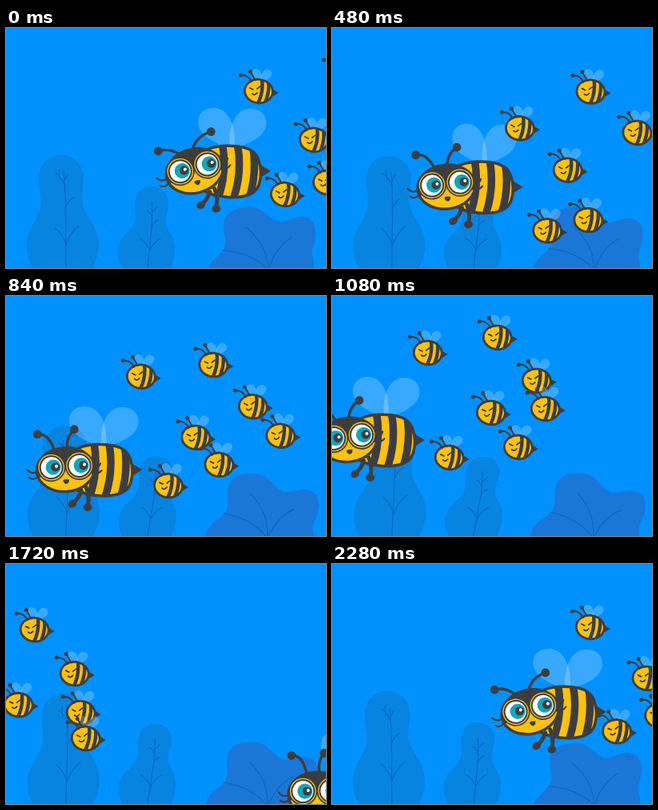
Animation, 400 px wide and 300 px high, one loop 2320 ms. Source, as an HTML page:

```html
<!DOCTYPE html>
<html lang="en">
<head>
<meta charset="utf-8">
<title>Bee swarm</title>
<style>
  html, body { margin: 0; width: 100%; height: 100%; overflow: hidden; background: #0091ff; }
  svg { display: block; width: 100vw; height: 100vh; }
  .dark { fill: #3d3d3f; }
  .gold { fill: #ffc20e; }
  .line { fill: none; stroke: #3d3d3f; stroke-linecap: round; stroke-linejoin: round; }
  .edge { stroke: #3d3d3f; }
  .wing { fill: #fff; fill-opacity: .22; }
  .bush { fill: #0783e0; }
  .leaf { fill: #1a77d8; }
  .vein { fill: none; stroke: #0a68bd; stroke-width: 1.1; stroke-linecap: round; }
</style>
</head>
<body>
<svg viewBox="0 0 400 300">
  <defs>
    <path id="trunk" d="M-40-20C-30-34 10-36 24-27C38-18 40 15 28 24C14 35-20 34-36 24Z"/>
    <clipPath id="trunkClip"><use href="#trunk"/></clipPath>
    <ellipse id="skull" cy="4" rx="36" ry="27.5"/>
    <clipPath id="skullClip"><use href="#skull"/></clipPath>
    <ellipse id="belly" rx="17.5" ry="14.8"/>
    <clipPath id="bellyClip"><use href="#belly"/></clipPath>

    <g id="eye">
      <circle class="dark" r="18"/>
      <circle class="gold" r="16.3"/>
      <circle class="dark" r="15"/>
      <circle r="13" fill="#fff"/>
      <circle cx="2.5" r="9.5" fill="#12a5bd"/>
      <circle class="dark" cx="5" r="5.6"/>
      <circle cx="6.5" cy="-1" r="2" fill="#fff"/>
    </g>

    <g id="small">
      <path class="wing" d="M4-12C-4-14-11-19-8-25C-5-31 6-29 4-12Z"/>
      <path class="wing" d="M3-12C2-22 7-29 13-27C20-24 17-14 3-12Z"/>
      <path class="dark" d="M15-4L25 2L15 8Z"/>
      <g transform="rotate(6)">
        <use href="#belly" class="gold"/>
        <g class="line" stroke-width="4.4" clip-path="url(#bellyClip)">
          <path d="M2-17Q7 0 0 17M10-17Q15 0 8 17"/>
        </g>
        <use href="#belly" class="line" stroke-width="2.8"/>
      </g>
      <g class="line">
        <path stroke-width="2" d="M-9-12Q-13-21-22-20M-4-14Q-8-20-10-24"/>
        <path stroke-width="1.8" d="M-11-4L-7-2M-2-3L2-6M-8 3Q-5 6-2 2"/>
      </g>
      <g class="dark">
        <circle cx="-22.5" cy="-20" r="2.5"/><circle cx="-10.5" cy="-24.5" r="2.5"/>
      </g>
    </g>
  </defs>

  <rect width="400" height="300" fill="#0091ff"/>

  <g id="bush1">
    <path class="bush" d="M69 159C87 159 98 174 97 190C96 205 93 214 97 225C102 239 116 249 116 272C116 286 111 295 106 304H36C30 295 26 284 26 270C26 252 38 243 42 228C46 213 41 203 41 188C41 172 51 159 69 159Z"/>
    <path class="vein" d="M75 302C74 265 76 215 72 180M75 271Q71 258 61 250M75 272Q79 257 91 247M75 224Q77 216 84 212M73 196Q70 187 62 181M73 191Q75 185 77 183M67 190L66 177"/>
  </g>
  <g id="bush2">
    <path class="bush" d="M181 198C196 198 204 209 203 221C202 234 198 238 200 246C203 256 211 261 211 276C211 288 208 296 204 304H147C142 295 139 286 140 276C141 261 155 256 160 244C165 232 159 227 162 214C164 204 171 198 181 198Z"/>
    <path class="vein" d="M177 302C178 275 185 250 182 217M179 277Q175 268 167 263M179 280Q182 270 193 263M182 248Q184 242 190 240M183 238Q181 231 176 228M183 230L189 224"/>
  </g>
  <g id="leaf">
    <path class="leaf" d="M250 312C250 292 268 286 273 274C277 262 269 254 273 240C277 228 291 224 306 224C322 224 328 239 341 242C352 243 359 235 371 236C383 237 388 247 387 260C386 272 380 276 384 288C387 299 383 306 378 316Z"/>
    <path class="vein" d="M300 249C318 264 327 280 328 304M270 278C292 279 311 286 326 300M357 262C345 269 335 281 329 300"/>
  </g>

  <g id="queen">
    <g id="wings">
      <path class="wing" d="M3 2C-8-1-41-11-41-32C-41-45-31-50-22-50C-8-50 5-35 3 2Z"/>
      <path class="wing" d="M-3 2C-5-34 7-49 22-49C32-49 41-43 41-31C41-10 10-2-3 2Z"/>
    </g>
    <path class="dark" d="M33-10L48-1L33 9Z"/>
    <g transform="rotate(3)">
      <use href="#trunk" class="gold"/>
      <g class="line" stroke-width="9.5" clip-path="url(#trunkClip)">
        <path d="M-15-38Q-5 0-17 38M4-38Q14 0 2 38M23-38Q33 0 21 38"/>
      </g>
      <use href="#trunk" class="line" stroke-width="3.6"/>
    </g>
    <g class="line" stroke-width="5">
      <path d="M-28 25Q-31 35-38 40M-22 21Q-17 33-20 44"/>
    </g>
    <g class="dark">
      <ellipse cx="-39" cy="41.5" rx="5.6" ry="4.6" transform="rotate(-30 -39 41.5)"/>
      <ellipse cx="-20" cy="46" rx="5.4" ry="4.8"/>
    </g>
    <g id="head">
      <path id="feelers" class="line" stroke-width="3.4"/>
      <circle id="knobL" class="dark" r="5.4"/>
      <circle id="knobR" class="dark" r="5.4"/>
      <use href="#skull" class="gold"/>
      <path class="dark" clip-path="url(#skullClip)" d="M-40-30H40V14Q20 6 0 4Q-20 6-40 14Z"/>
      <use href="#skull" class="line" stroke-width="3.4"/>
      <path class="line" stroke-width="2.2" d="M-34 4Q-43 8-48 1M-33 9Q-41 16-46 11M34 4Q41 6 44-1M33 9Q40 13 45 8"/>
      <use href="#eye" x="-17.5"/>
      <use href="#eye" x="17.5"/>
      <path class="dark" d="M-4 17Q0 15 4 17Q3 22 0 22Q-3 22-4 17Z"/>
    </g>
  </g>
  <g id="swarm"></g>
</svg>
<script>
const LOOP = 2320, TAU = Math.PI * 2;
const el = id => document.getElementById(id);
const place = (node, value) => node.setAttribute('transform', value);
const mix = (a, b, k) => a + (b - a) * k;

// Waypoints: time, x, y, head tilt
const queenPath = [
  [-760, 475, 325, 0], [-600, 437, 289, 1], [-40, 295, 186, 13], [0, 283, 180, 14.5],
  [160, 246, 167, 15], [320, 214, 177, 11], [640, 166, 220, 3], [760, 140, 224, 3],
  [1080, 68, 181, 7], [1400, -8, 160, 9], [1700, -85, 180, 9]
];

const swarm = [];
function addBee(...path) {
  const node = document.createElementNS('http://www.w3.org/2000/svg', 'use');
  node.setAttribute('href', '#small');
  el('swarm').append(node);
  swarm.push({ node, path });
}
addBee([-600, 440, 110], [-300, 378, 92], [-40, 323, 79], [0, 316, 79], [320, 264, 116],
  [640, 205, 126], [1080, 120, 71], [1400, 32, 92], [1700, -50, 120]);
addBee([-160, 455, 74], [0, 420, 60], [160, 383, 43], [320, 350, 55], [640, 298, 99],
  [1080, 207, 52], [1260, 163, 32], [1400, 125, 41], [1720, 36, 82], [1960, -35, 100]);
addBee([0, 470, 90], [320, 412, 104], [640, 350, 153], [1080, 256, 106],
  [1400, 176, 96], [1720, 86, 137], [2100, -30, 165]);
addBee([-300, 455, 185], [0, 385, 140], [320, 323, 158], [640, 268, 192],
  [1080, 199, 146], [1400, 134, 127], [1720, 16, 176], [1900, -50, 190]);
addBee([-150, 430, 182], [0, 402, 193], [320, 348, 241], [640, 294, 230], [1080, 233, 189],
  [1400, 174, 186], [1720, 94, 186], [2000, 12, 205], [2200, -45, 210]);
addBee([-400, 425, 262], [0, 349, 208], [320, 294, 236], [640, 243, 263],
  [1080, 147, 202], [1400, 57, 221], [1700, -40, 240]);
addBee([320, 480, 200], [640, 405, 206], [1080, 267, 141], [1400, 182, 174],
  [1720, 100, 218], [2150, -30, 190]);

function slope(path, i, c) {
  const rate = j => (path[j + 1][c] - path[j][c]) / (path[j + 1][0] - path[j][0]);
  if (i === 0) return rate(0);
  if (i === path.length - 1) return rate(i - 1);
  const before = path[i][0] - path[i - 1][0], after = path[i + 1][0] - path[i][0];
  return (rate(i - 1) * after + rate(i) * before) / (before + after);
}

// Smooth curve through the waypoints, held still past either end
function follow(path, ms) {
  const last = path.length - 1;
  let t = ms > path[0][0] + LOOP ? ms - LOOP : ms;
  t = Math.min(Math.max(t, path[0][0]), path[last][0]);
  let i = 0;
  while (i < last - 1 && t > path[i + 1][0]) i++;
  const a = path[i], b = path[i + 1], h = b[0] - a[0], u = (t - a[0]) / h, v = 1 - u;
  return a.slice(1).map((p, n) => {
    const c = n + 1;
    return p * (1 + 2 * u) * v * v + b[c] * u * u * (3 - 2 * u)
      + h * u * v * (v * slope(path, i, c) - u * slope(path, i + 1, c));
  });
}

function drawQueen(ms) {
  const [x, y, tilt] = follow(queenPath, ms);
  place(el('queen'), `translate(${x} ${y})`);
  const flap = .975 + .085 * Math.cos(TAU * (ms - 260) / 290);
  place(el('wings'), `translate(0 -30) scale(${flap} 1)`);
  place(el('head'), `translate(-48 -5) rotate(${-tilt})`);

  const k = (tilt - 3) / 12;
  const lx = mix(-32, -38, k), ly = mix(-43, -31, k);
  const rx = mix(13, 33, k), ry = mix(-46, -38, k);
  el('feelers').setAttribute('d',
    `M-12-20Q${lx + 14} ${ly - 1} ${lx} ${ly}M4-22Q${mix(2, 13, k)} ${mix(-36, -38, k)} ${rx} ${ry}`);
  place(el('knobL'), `translate(${lx} ${ly})`);
  place(el('knobR'), `translate(${rx} ${ry})`);
}

function drawPlants(ms) {
  const k = (1 - Math.cos(TAU * (ms - 60) / LOOP)) / 2;
  const sway = (id, x, lean) =>
    place(el(id), `translate(${x} 300) skewX(${-lean * k}) scale(1 ${1 - .03 * k}) translate(${-x} -300)`);
  sway('bush1', 72, 3.2);
  sway('bush2', 177, 4.6);
  place(el('leaf'), `rotate(${9 * k} 322 292)`);
}

const start = performance.now();
function draw() {
  const ms = (performance.now() - start) % LOOP;
  drawPlants(ms);
  drawQueen(ms);
  for (const bee of swarm) {
    const [x, y] = follow(bee.path, ms);
    place(bee.node, `translate(${x} ${y})`);
  }
  requestAnimationFrame(draw);
}
draw();
</script>
</body>
</html>
```
